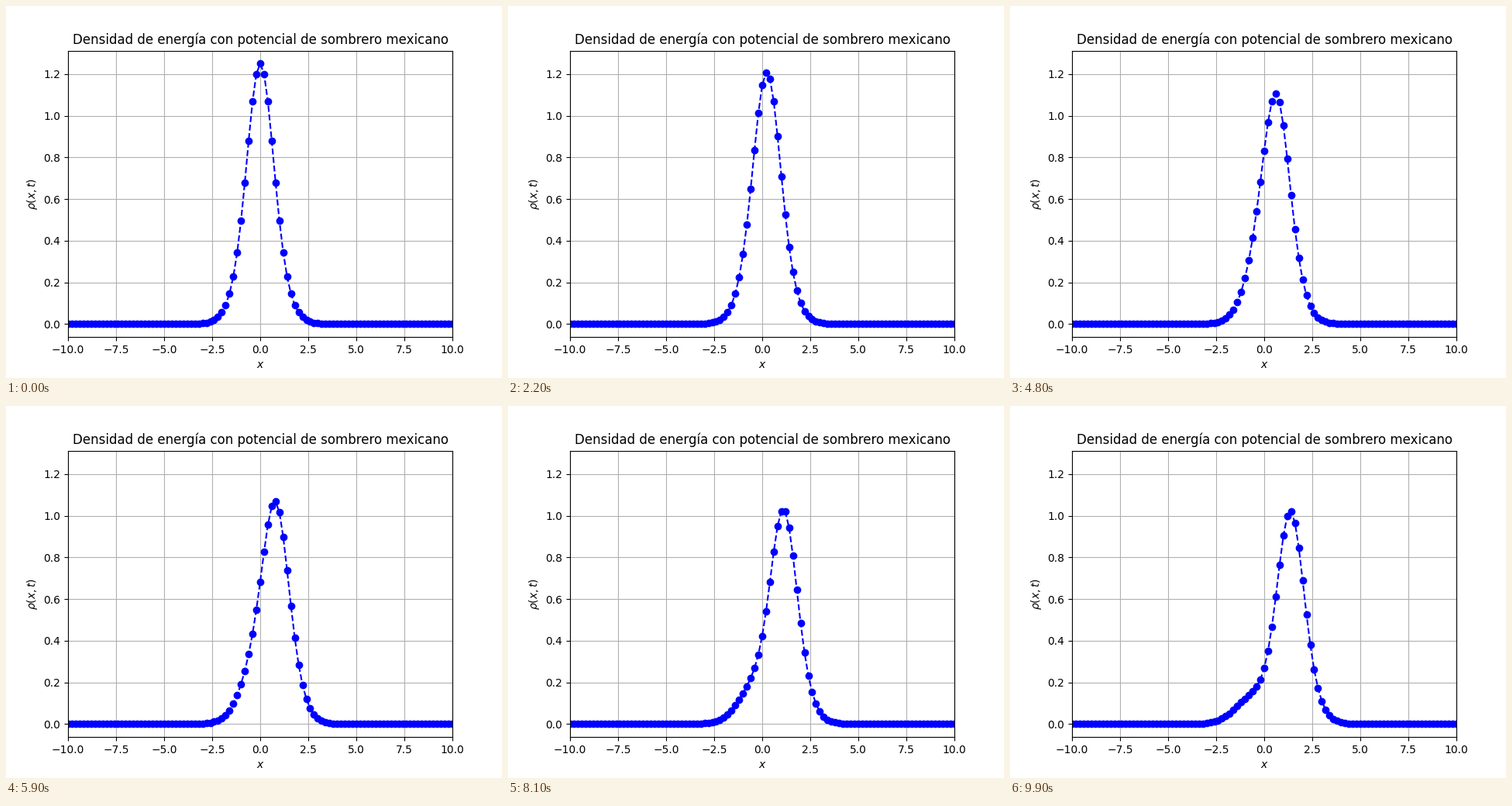
A matplotlib script for the animation above (10 s loop, 640 by 480 pixels).

```python
import numpy as np
import matplotlib.pyplot as plt
from matplotlib.animation import FuncAnimation

FRAMES = 100
INTERVAL = 100
PEAK = 1.25

x = np.linspace(-10, 10, 101)


def bump(center, k):
    """Energy profile of a kink: sech^4."""
    return np.cosh(k * (x - center)) ** -4


def density(n):
    """Main kink moving right plus a weaker, spreading wave moving left."""
    right = 1.04 + 0.025 * np.cos(np.pi * n / 88)
    left = 0.185 / (1 + (n / 116) ** 2.3)
    center = 0.0133 * n + 5e-6 * n ** 2
    k = 1 / np.sqrt(2)
    k_left = k - 0.075 * (n / 99) ** 2
    return right * bump(center, k) + left * bump(-0.0077 * n, k_left)


fig, ax = plt.subplots(figsize=(6.4, 4.8), dpi=100)
line, = ax.plot(x, density(0), "bo--")
ax.set_xlim(-10, 10)
ax.set_ylim(-0.05 * PEAK, 1.05 * PEAK)
ax.set_xlabel(r"$x$")
ax.set_ylabel(r"$\rho(x,t)$")
ax.set_title("Densidad de energía con potencial de sombrero mexicano")
ax.grid(True)


def update(n):
    line.set_ydata(density(n))
    return line,


anim = FuncAnimation(fig, update, frames=FRAMES, interval=INTERVAL,
                     repeat=True, repeat_delay=0)
plt.show()
```
